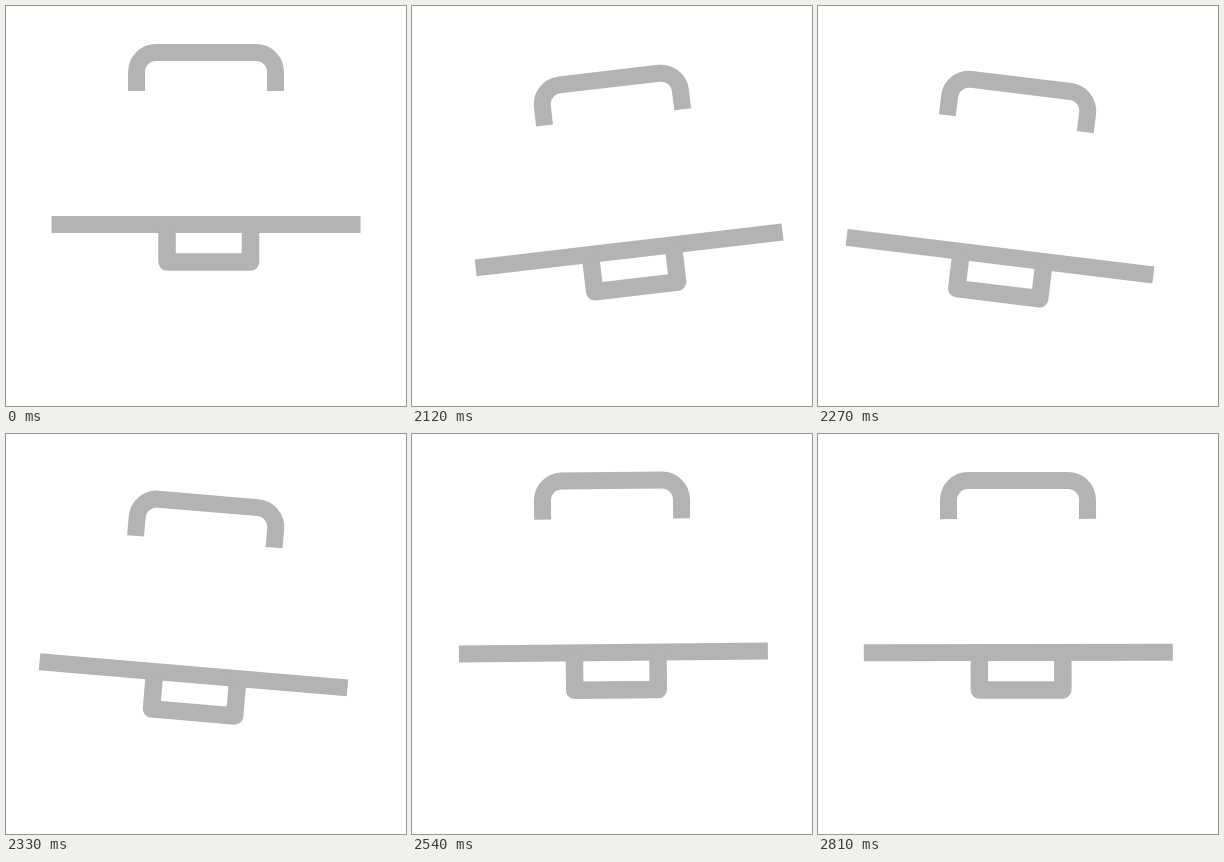
These frames come from a looping animation (400x400 px, 2840 ms). An HTML page:

```html
<!DOCTYPE html>
<html lang="en">
<head>
<meta charset="utf-8">
<title>Briefcase</title>
<style>
  html, body { margin: 0; width: 100%; height: 100%; overflow: hidden; background: #fff; }
  svg { display: block; width: 100%; height: 100%; }
  path { fill: none; stroke: #b3b3b3; }
</style>
</head>
<body>
<svg viewBox="0 0 400 400">
  <g id="bag">
    <path stroke-width="17" d="M130.5 85V66a19.5 19.5 0 0 1 19.5-19.5H250a19.5 19.5 0 0 1 19.5 19.5V85"/>
    <path stroke-width="17" d="M45.5 218.5H354.5"/>
    <path stroke-width="17.5" stroke-linejoin="round" d="M161 220V256H244.5V220"/>
  </g>
</svg>
<script>
  const LOOP = 2840, REST = 2030, STEP = 30, START = 2000;
  const bag = document.getElementById('bag');

  // Swing extremes: [ms after START, degrees]
  const swing = [[0, 0], [140, -7], [270, 7], [470, -3.4], [605, 2], [730, -1.2], [830, 0]];
  const drop = { from: 5, peak: 220, to: 418, depth: 35.5 };

  function angle(t) {
    for (let i = 1; i < swing.length; i++) {
      const [t0, a0] = swing[i - 1], [t1, a1] = swing[i];
      if (t < t1) return a0 + (a1 - a0) * (1 - Math.cos(Math.PI * (t - t0) / (t1 - t0))) / 2;
    }
    return 0;
  }

  function fall(t) {
    const { from, peak, to, depth } = drop;
    if (t <= from || t >= to) return 0;
    const side = t < peak ? peak - from : to - peak;
    return depth * Math.cos((t - peak) / side * Math.PI / 2);
  }

  function draw(now) {
    const time = now % LOOP;
    // The motion advances in fixed steps after the rest
    const t = time < REST ? 0 : REST - START + Math.floor((time - REST) / STEP) * STEP;
    bag.setAttribute('transform', `translate(0 ${fall(t)}) rotate(${angle(t)} 200 71)`);
  }

  let begin;
  function tick(now) {
    begin ??= now;
    draw(now - begin);
    requestAnimationFrame(tick);
  }
  requestAnimationFrame(tick);
</script>
</body>
</html>
```
